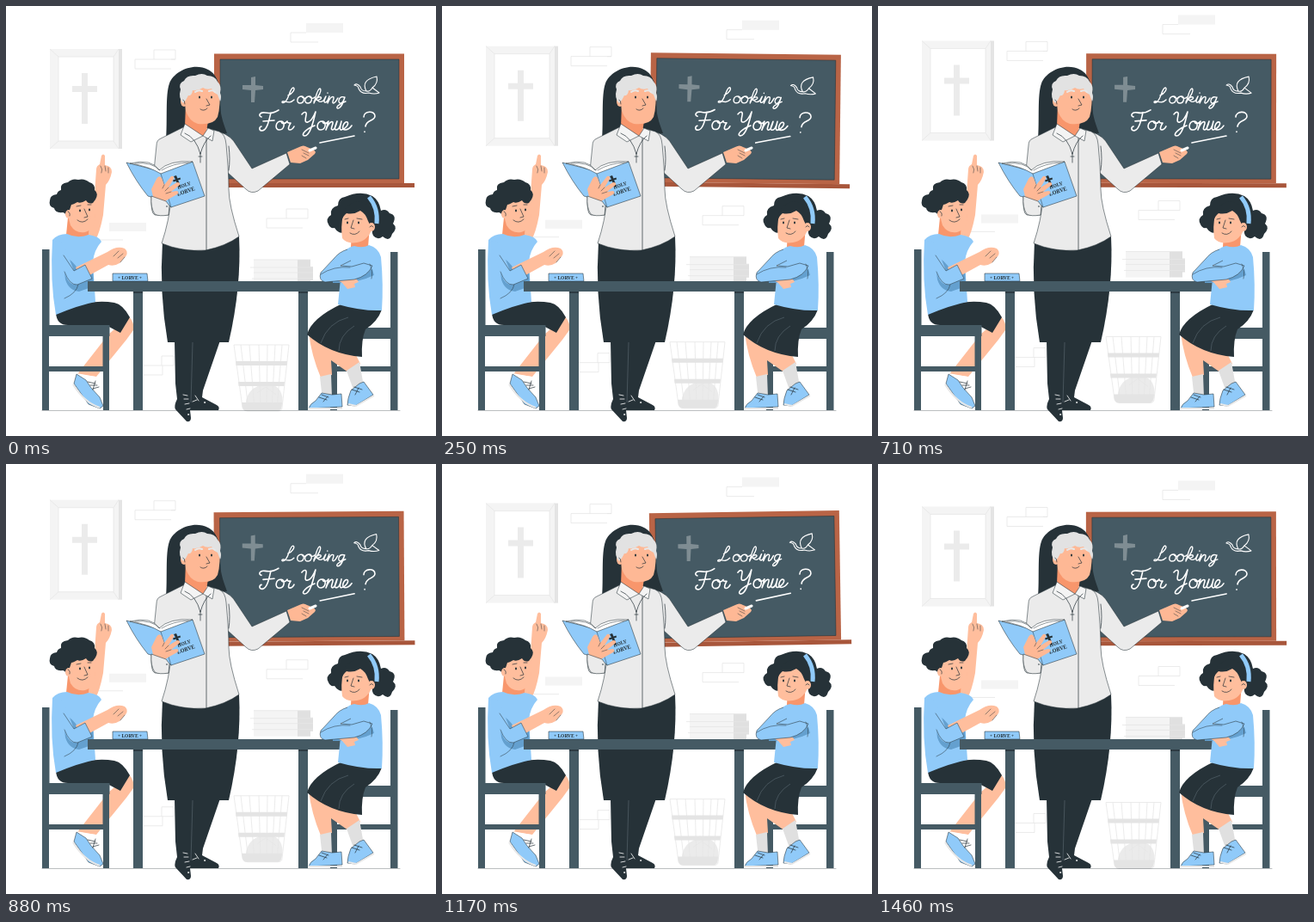
Recreate the animation shown at these times as an HTML page. Size 500x500 px, loop 1500 ms.

```html
<!DOCTYPE html>
<html lang="en">
<head>
<meta charset="utf-8">
<title>Classroom</title>
<style>
html, body { margin: 0; height: 100%; overflow: hidden; background: #fff; }
svg { display: block; width: 100vw; height: 100vh; }
.dark { fill: #263238; }
.steel { fill: #455a64; }
.blue { fill: #90caf9; }
.shade { fill: #64a0cf; }
.skin { fill: #ffbe9d; }
.tan { fill: #feb895; }
.blush { fill: #f8966c; }
.cloth { fill: #ebebeb; }
.pale { fill: #f4f4f4; }
.white { fill: #fff; }
.line { fill: none; stroke: #263238; stroke-width: .7; stroke-linecap: round; stroke-linejoin: round; }
.thin { stroke-width: .5; }
.edge { stroke: #263238; stroke-width: .55; stroke-linejoin: round; }
.faint { fill: none; stroke: #e6e6e6; stroke-width: .8; }
.chalk { fill: none; stroke: #fff; stroke-width: 1.6; stroke-linecap: round; stroke-linejoin: round; }
text { font-family: "Noto Serif", serif; font-weight: bold; fill: #263238; }
</style>
</head>
<body>
<svg viewBox="0 0 500 500">
  <g id="backdrop">
    <g id="bricks">
      <path class="pale" d="M349 20h43v11h-43zM120 252h43v10h-43z"/>
      <path class="faint" d="M349 31h-18v11h32M172 62v-11h25v11h-47v11h42M197 62h-5M326 247v-11h25v11h-48v11h42M105 272h31M181 418v-11h14v11h-42M160 429h22v-11"/>
    </g>
    <g id="picture">
      <path fill="#e4e4e4" d="M130 50h5v116h-5z"/>
      <path class="pale" d="M51 50h80v116H51z"/>
      <path fill="#fff" stroke="#e8e8e8" stroke-width=".8" d="M61 59h64v98H61z"/>
      <path class="faint" d="M51 50l10 9M131 50l-6 9M51 166l10-9M131 166l-6-9"/>
      <path class="cloth" d="M88 78h7v15h11v7h-11v37h-7v-37h-11v-7h11z"/>
    </g>
    <g id="papers">
      <path class="pale" d="M288 295h52v30h-52z"/>
      <path fill="#e0e0e0" d="M339 295h15v8h3v16h-3v6h-15z"/>
      <path class="faint" d="M288 295h66M284 304h73M288 310h69M286 317h71"/>
    </g>
    <g id="basket">
      <path class="cloth" d="M281 470c-6-10 2-24 10-27l9-6 11 4c9 3 13 14 9 28z"/>
      <path class="faint" d="M265 394h64l-8 73q0 4-5 4h-35q-5 0-6-4zM273 394l9 76M283 394l6 76M294 394l2 76M304 394l-1 76M313 394l-4 76M321 394l-6 76M292 450l10-7 12 9"/>
      <path fill="#e4e4e4" d="M267 413h60l-.5 5h-59zM270 437h54l-.5 5h-53zM274 461h47l-1 6q-1 4-4 4h-36q-4 0-5-4z"/>
    </g>
  </g>

  <path class="line" d="M42 470.500h416" opacity=".45"/>

  <g id="board">
    <path fill="#a8563b" d="M250 206h225v5H250z"/>
    <path fill="#b96446" d="M242 55.500h221V206H242z"/>
    <path class="steel edge" d="M249 62h208v139H249z"/>
    <path fill="#7f8d93" d="M285 83l5-1v10l9 1v4l-9 1-1 14h-4V98l-10-1v-5h10z"/>
    <g class="chalk" transform="translate(-2 0)">
      <path stroke-width="1.100" d="M407 92q3-3 7 2q1 5 7 5q-7-13 12-17q2 8-5 13l8 6q-6 2-12 0q-9 2-12-5q0-3-5-4zM421 99q4 1 7-4"/>
      <g stroke-width="1.400">
        <path d="M330 104c5-2 9-8 6-9c-4 0-5 14-10 17c-4 2-4-2 0-1c4 1 7 2 11-2"/>
        <path id="o" d="M346 105c-6 0-7 8-2 8c5 0 6-8 2-8c1 3 4 3 6 1"/>
        <use href="#o" x="9"/>
        <path d="M360 111c5-4 10-14 7-15c-3 0-5 11-7 17c2-5 5-8 8-7c2 2-3 4-5 3c2 0 3 5 8 1c2-2 2-4 3-5c-1 3-4 8 0 7c2-1 3-4 4-7l-2 8c2-5 5-9 7-7c1 2-3 7 0 7c3-1 3-4 5-6M395 106c-6-2-8 7-4 7c3 0 4-5 5-7c-2 6-4 13-8 13c-4-1 3-6 9-8M376 101v.3"/>
      </g>
      <path d="M299 129c-4-1-2-6 4-5c5 1 10 1 16-3M310 124c-2 8-4 20-10 21c-4 0-4-4-1-5M301 134l13-1M322 134c-7 0-8 10-2 10c6 0 7-10 2-10c1 4 5 3 7 0c0 2 1 2 4 2c-2 3-4 8-1 8c2 0 4-2 5-4"/>
      <path d="M346 126c3-4 6-3 5 1c-1 5-2 9 2 8c4-1 7-7 9-12c-2 9-6 28-13 28c-5-1 2-8 12-12M370 134c-7 0-8 10-2 10c6 0 7-10 2-10c1 4 5 3 7 0l-3 10c2-6 6-11 8-9c1 2-4 9 0 9c3-1 4-6 5-10c-2 5-4 10-1 10c3 0 5-5 6-10c-1 5-3 10 0 10c5-1 9-7 7-9c-4-2-8 9-3 9c3 0 6-2 8-5"/>
      <path d="M418 129c0-7 13-8 13-1c0 6-10 4-11 12M419 146v.4M367 159l40-8"/>
    </g>
  </g>

  <g id="teacher">
    <path class="dark" d="M196 389l1 50 2 18q-4 8-2 12l13 14q5 1 5-4l-1-9h33q2-4-2-6l-17-9 1-8 20-58z"/>
    <path d="M217 391l-2 70" fill="none" stroke="#56636a" stroke-width=".7"/>
    <g fill="none" stroke="#fff" stroke-width=".8" stroke-linecap="round">
      <path d="M206 452l5 1M207 457l5 0M208 463l5-1M210 469l4-1M220 453l4 6M217 460l5-2"/>
      <circle cx="231" cy="461" r=".6"/><circle cx="212" cy="475" r=".6"/>
    </g>
    <path class="dark" d="M182 274q-4 60 6 117h71q15-65 12-123z"/>
    <path class="dark" d="M186 156c2-23-1-52 4-66 5-14 28-25 45-16 12 6 15 22 14 38 0 14 3 22 8 36z"/>
    <path class="cloth edge" d="M250 147q12 4 18 15l18 27 40-18 4 13-37 31q-8 4-14-2l-22-20z"/>
    <path class="cloth edge" d="M206 141l-26 13q-5 2-5 8l-6 59q-1 20 4 22l16 0 1-20 2 0q-2 26-11 53 24 10 51 8 24-5 39-16-12-37-12-55 0-20-3-52-1-12-8-15l-17-5z"/>
    <path class="line" d="M233 152v132M259 163q2 15 0 28M192 224q-1-15-5-26M172 229q10 3 18 1"/>
    <path class="blush" d="M209 114l-1 26q11 7 24 12l3-18z"/>
    <path class="pale edge" d="M208 137l-5 13 12 8 14-7zM229 151l6-9 7 3-2 12z"/>
    <path class="line" d="M208 148q13 5 18 24M238 151q-8 6-12 21M226 171v11M224 175h4"/>
    <path class="tan" d="M206 94l3 28q4 12 14 15 18 2 23-8 4-14 2-36l-20-7z"/>
    <ellipse class="tan" cx="207" cy="111" rx="4" ry="6"/>
    <path fill="#e2e2e2" d="M206 113q-6-6-3-16-3-7 4-10 3-7 13-6 8-4 14 0 9 0 12 7 5 5 3 13 2 5 0 10l-3-8q-5-2-7-7-6 2-10-1-6 4-12 3-1 7-5 6-2 5-6 9z"/>
    <path d="M220 100q4-3 8-1M236 99q4-2 7 1" fill="none" stroke="#e8e8e8" stroke-width="2" stroke-linecap="round"/>
    <path class="line" d="M233 108l4 7-4 1M226 120q4 3 8-1M206 109q2 1 2 5"/>
    <path class="dark" d="M224 106a1 1.500 0 1 0 2 0a1 1.500 0 1 0-2 0M238 106a1 1.500 0 1 0 2 0a1 1.500 0 1 0-2 0"/>

    <path class="tan" d="M327 170l14-6q5-3 9 0l5 2q7 3 4 6l-8 7-9 4-11-1z"/>
    <path class="line thin" d="M344 167l8 4M346 171l6 3M344 174l5 3"/>
    <path d="M353 168l7-3" stroke="#fff" stroke-width="3" stroke-linecap="round"/>

    <path class="blue edge" d="M140 182l39 10 38-11 14 40-39 13-9-8-18-5q-14-17-25-39z"/>
    <path class="white edge" d="M144 183q26-6 34 8 12-12 39-10l-37 14q-15-9-36-12z"/>
    <path class="line thin" d="M150 183q20-2 29 8M181 191q13-8 31-9M180 195l12 39"/>
    <path class="dark" d="M195 198l3-1 1.500 3.600 3-1 .6 2-3 1 3 7-2.500 .8-2.900-7-3 1-.7-2 3-1z"/>
    <g transform="translate(200 213) rotate(-19)">
      <text font-size="5.500">HOLY</text>
      <text font-size="6.200" x="-3" y="7.500">LORVE</text>
    </g>
    <path class="tan" d="M169 213l6-12q3-5 6-1l3 8 8-10q4-1 3 3l-6 10 10-6q4 0 3 3l-10 8 7-1q3 2 0 4l-9 5-8 5-10-3z"/>
    <path class="line thin" d="M184 208l-2 4M189 211l-4 4M192 216l-6 2"/>
    <path class="cloth edge" d="M169 221l17 6 4 5-1 11q-11 2-16-1-5-7-4-21z"/>
    <circle class="dark" cx="187" cy="233" r=".8"/>
  </g>

  <g id="boy">
    <path class="skin" d="M92 270q11-30 12-66l1-14q0-4 4-6l2-10q2-3 4 0v11q8 1 8 8-2 10-7 15l-3 35q-4 21-9 29z"/>
    <path class="line thin" d="M110 186q3 4 1 8M115 186l1 6M119 188v6"/>
    <path class="skin" d="M143 361q7 8 5 16l-8 11-35 43-22-3 36-46z"/>
    <path class="white" d="M82 427l22 4 8 22-4 3z"/>
    <path class="blue edge" d="M82 428l11 7 6 9 10 11 4 10-4 3-13-5-17-24z"/>
    <path d="M78 440q13 21 31 27" fill="none" stroke="#e8e8e8" stroke-width="2"/>
    <path class="line" d="M95 437l9 2M98 441l8 0M101 445l7-2M104 436l-3 10"/>
    <path class="dark" d="M58 357q1 14 14 14h44l17 9 11-18q-8-15-18-17-32-5-68 12z"/>
    <path class="blush" d="M72 246l-2 20q12 9 26 0l1-14z"/>
    <path class="blue" d="M54 272q6-7 17-7 12 6 25 1 13 2 15 8-9 10-10 24l3 46q-20 4-46 15-7-39-4-87z"/>
    <path class="shade" d="M66 291q12 4 18 16l17-5 1 24-17 6q-12-1-16-14z"/>
    <path class="line thin" d="M68 340q14-6 16-16"/>
    <path class="skin" d="M81 304l37-18q11-8 20-4 4 3 2 8l-8 9q-6 4-13 2l-31 17z"/>
    <path class="line thin" d="M125 291l6-6M130 293l6-5M133 298l5-6"/>
    <path class="blue" d="M55 275q8-6 13 4l11 29 13-7 8 16-17 7q-9 1-13-9z"/>
    <path class="line thin" d="M67 290l12 18 13-7 8 16-17 7q-9 1-15-15"/>
    <path class="skin" d="M72 224q-1 19 3 31 6 10 17 8 11-3 12-18l-1-25-18-4z"/>
    <path class="dark" d="M71 246q-2-6-5-6-9 1-10-5-7-2-5-9 0-6 8-7 1-4 5-5-2-8 8-9 5-5 12-3 7-2 13 3 7 2 6 9 5 4 1 11l-3 4q-5 2-8-3-6 4-10 2-5 3-7 3l-2 6z"/>
    <ellipse class="skin" cx="73" cy="242" rx="4" ry="5"/>
    <path class="line" d="M91 236l4 9-4 1M83 249q6 5 12-1M82 233l5-1M95 231l4 0M72 239q3 1 2 5"/>
    <path class="dark" d="M85 238a1 1.400 0 1 0 2 0a1 1.400 0 1 0-2 0M96 237a1 1.400 0 1 0 2 0a1 1.400 0 1 0-2 0"/>
    <path class="steel" d="M42 283h8.500v88h70v13h-.5v86h-7v-45H50v45h-8zM50 384v35h62.500v-35z" fill-rule="evenodd"/>
  </g>

  <path class="steel" d="M447 286h8.500v184H447v-45h-62v45h-8v-83h-2v-13h72zM385 387v32h62v-32z" fill-rule="evenodd"/>
  <path class="steel" d="M95 320h315v12H351v138h-11V332H159v138h-11V332H95z"/>
  <path d="M148 333h11M340 333h11" stroke="#263238" stroke-width="1.500"/>
  <g id="textbook">
    <path class="blue edge" d="M124 311h40l1 9h-41z"/>
    <text x="144" y="317.500" font-size="5.500" text-anchor="middle">+ LORVE +</text>
  </g>

  <g id="girl">
    <path class="skin" d="M352 380q3 26 14 52l13-3-1-17 20 14 14-10-10-20z"/>
    <path fill="#e0e0e0" d="M365 431l13-3 1 27-11 3zM396 424l15-10 5 28-11 7z"/>
    <path class="blue edge" d="M367 450l12 2 11-1 1 15-39 2q1-5 8-9zM401 447l10-8 5-2 11 15-21 13-9-1q0-7 4-17z"/>
    <path d="M352 468h39M398 463l9 2 21-12" fill="none" stroke="#e8e8e8" stroke-width="2"/>
    <path class="line" d="M364 455l9 3M367 452l8 3M369 460l5-6M402 446l9 3M405 443l9 3M406 452l4-8"/>
    <path class="dark" d="M391 346q-36 17-41 36 26 23 64 26-1-20 4-32 14-9 19-23z"/>
    <path d="M398 362q-24 6-32 30M405 372q-18 11-18 29" fill="none" stroke="#5c6b72" stroke-width=".6"/>
    <path class="dark" d="M394 222Q386 223 386 232Q376 235 378 243Q371 247 375 254Q377 259 382 258Q388 267 396 262L428 250Q424 262 427 267Q432 273 438 268Q446 275 449 265Q456 258 450 253Q455 243 446 241Q442 235 436 238Q434 226 426 221Q412 214 394 222Z"/>
    <path class="blush" d="M402 262l-1 18q9 7 20 0l2-24z"/>
    <path class="blue" d="M395 284q4-4 10-5 10 3 17-1 11 3 14 14 3 32 1 62-23 1-51-7l4-40z"/>
    <path class="skin" d="M392 242q-3 15-1 28 5 7 17 5 13-2 18-17l0-18-14-7z"/>
    <path class="dark" d="M390 250q0-18 18-23 18 1 22 24l-5 7-4-8q-3-9-9-12-8 5-16 3-4 3-6 9z"/>
    <path d="M422 222q11 13 9 31" fill="none" stroke="#90caf9" stroke-width="5"/>
    <ellipse class="skin" cx="425" cy="257" rx="4" ry="5"/>
    <path class="line" d="M404 249l-3 9 4 1M400 264q6 4 11-2M394 248l4-1M408 247l6 1M423 257q2-3 4 0"/>
    <path class="dark" d="M396 252a1 1.400 0 1 0 2 0a1 1.400 0 1 0-2 0M409 252a1 1.400 0 1 0 2 0a1 1.400 0 1 0-2 0"/>
    <path class="shade" d="M380 318l26-3 20-9 2 7q-20 10-48 9z"/>
    <path class="skin" d="M386 319l16-3q7 1 8 5l-5 2 1 4-9 2-6-7z"/>
    <path class="blue edge" d="M397 283q-10 3-16 11l-15 16q-3 9 5 11l34-3q16-4 21-16l-10-3-14 4-13-1 12-6"/>
    <path class="line thin" d="M366 312q15-10 34-8M423 300q4 9 2 17"/>
  </g>
</svg>
<script>
const LOOP = 1500;
const backdrop = document.getElementById("backdrop");
const board = document.getElementById("board");

// Linear wave from -1 to 1, zero at the start of the loop.
const triangle = p => 1 - 4 * Math.abs((p + .25) % 1 - .5);

function draw(now) {
  const p = now % LOOP / LOOP;
  const lift = 10 * (1 - Math.abs(2 * p - 1));
  backdrop.setAttribute("transform", `translate(0 ${-lift})`);
  board.setAttribute("transform", `rotate(${triangle(p)} 358 133)`);
  requestAnimationFrame(draw);
}
draw(0);
</script>
</body>
</html>
```
